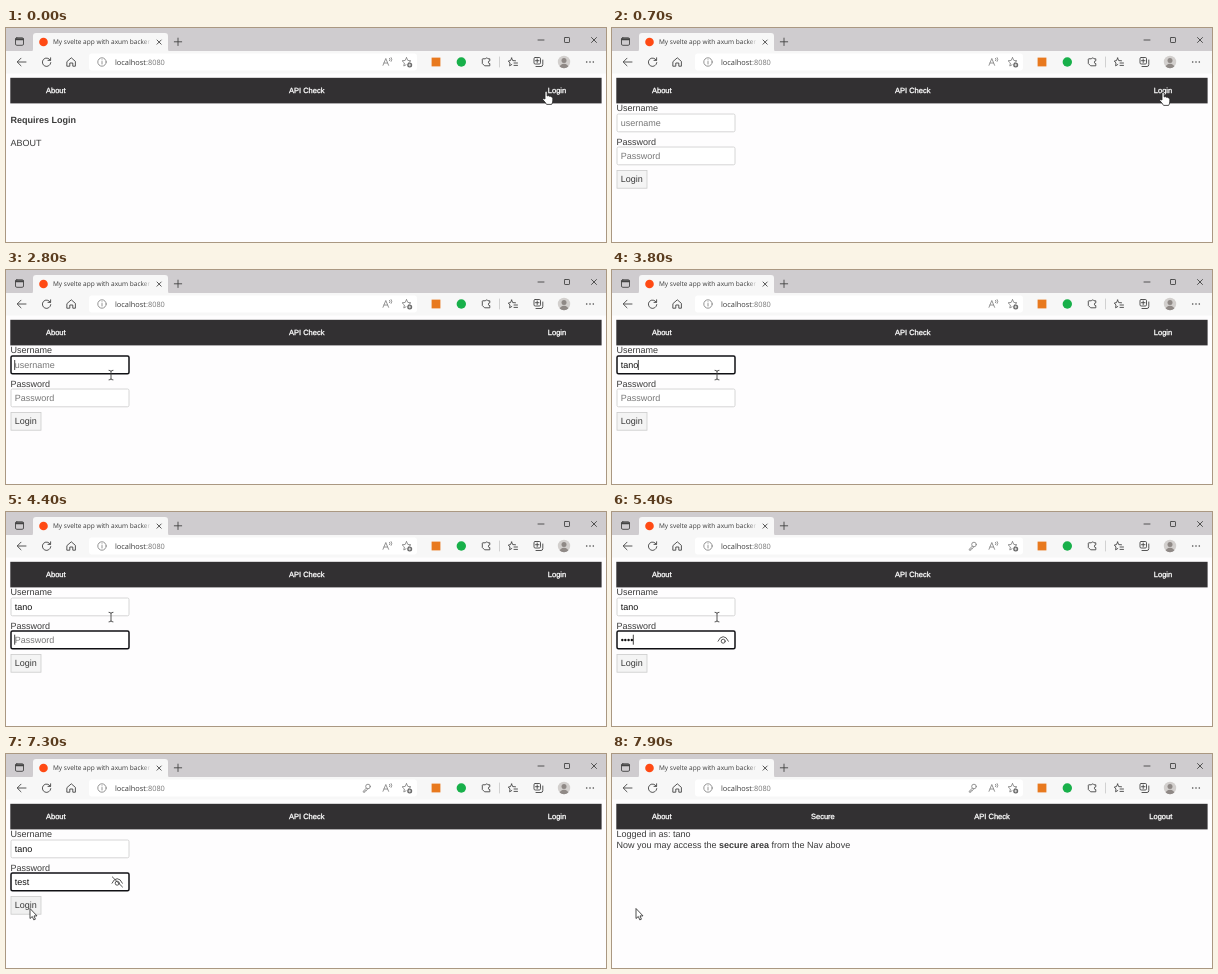
An HTML page for the animation above (8 s loop, 600x214 px).

```html
<!DOCTYPE html>
<html lang="en">
<head>
<meta charset="utf-8">
<title>Login demo</title>
<style>
  html, body { margin: 0; width: 100%; height: 100%; overflow: hidden; background: #fefdfe; }
  svg { display: block; }
  text { font: 9px "Liberation Sans", Arial, sans-serif; fill: #3a3a3a; white-space: pre; text-rendering: geometricPrecision; }
  .ui { font-family: "Open Sans", "Noto Sans", sans-serif; }
  .nav { font-size: 7.5px; fill: #fff; stroke: #fff; stroke-width: .3; }
  .b { font-weight: bold; }
  .hint { fill: #777; }
  .typed { fill: #111; }
  .line { fill: none; stroke: #444; stroke-width: .9; stroke-linecap: round; stroke-linejoin: round; }
  .soft { stroke: #888; }
  .box { fill: #fff; stroke: #ccc; stroke-width: .8; }
  .focus { stroke: #101014; stroke-width: 1.5; }
  .pointer { fill: #fff; stroke: #222; stroke-width: .8; stroke-linejoin: round; }
</style>
</head>
<body>
<svg width="600" height="214" viewBox="0 0 600 214">
  <clipPath id="title"><rect x="46" y="5" width="98" height="18"/></clipPath>
  <clipPath id="face"><circle cx="558" cy="34" r="6.2"/></clipPath>
  <linearGradient id="fade"><stop stop-color="#f7f7f7" stop-opacity="0"/><stop offset="1" stop-color="#f7f7f7"/></linearGradient>

  <!-- tab strip -->
  <rect width="600" height="24" fill="#cfcccf"/>
  <path d="M24 24Q27 24 27 21V8Q27 5 30 5H159Q162 5 162 8V21Q162 24 165 24Z" fill="#f7f7f7"/>
  <g class="line">
    <rect x="9.5" y="9.8" width="8" height="7.5" rx="1.3"/>
    <path d="M10 11.3H17" stroke-width="2"/>
    <path d="M151 12L155.2 16.2M155.2 12L151 16.2M168.3 13.8H175.7M172 10.1V17.5"/>
    <path d="M532 12H538M585.5 9.5L590.5 14.5M590.5 9.5L585.5 14.5"/>
    <rect x="558.5" y="9.5" width="5" height="5" rx=".6"/>
  </g>
  <circle cx="37.5" cy="14" r="4.3" fill="#ff4a14"/>
  <text class="ui" x="47" y="16.2" style="font-size:6.5px" clip-path="url(#title)">My svelte app with axum backend</text>
  <rect x="136" y="8" width="9" height="12" fill="url(#fade)"/>

  <!-- toolbar -->
  <rect y="23" width="600" height="22.5" fill="#f7f7f7"/>
  <rect x="83" y="25.5" width="328" height="17" rx="3" fill="#fff"/>
  <g class="line">
    <path d="M20 34H11.5M15 30.2L11.2 34L15 37.8"/>
    <path d="M44.3 32.2A4.2 4.2 0 1 0 44.8 34.6M44.6 29.8V32.4H42"/>
    <path d="M61.2 33.4L65.3 29.8L69.4 33.4V38.2H66.8V35H63.8V38.2H61.2Z"/>
    <path d="M477 30.8H479.4A1.4 1.4 0 0 1 482 30.8H483.8V32.8A1.4 1.4 0 0 0 483.8 35.6V37.8H478.6L476.3 35.5V31.6Z"/>
    <path d="M493.5 29V39" stroke="#ccc"/>
    <path d="M505.6 30L506.7 32.6L509.5 32.8M505.6 30L504.5 32.6L502.3 33L504 35L503.6 37.8L505.8 36.5M508 35H511.5M508 37.4H511.5"/>
    <rect x="528" y="29.5" width="6.5" height="6.5" rx="1.2"/>
    <path d="M530 38.5H535Q536.8 38.5 536.8 36.5V32M529.5 32.7H533M531.2 31V34.5"/>
  </g>
  <g class="line soft">
    <circle cx="96" cy="34" r="4.2"/>
    <path d="M96 33.5V36M96 31.8V31.9"/>
    <path d="M377 37.3L379.8 30.5L382.6 37.3M378 35H381.6M383.6 30.3Q384.6 31.5 383.6 32.7M385.2 29.6Q386.6 31.5 385.2 33.4"/>
    <path d="M400.5 29.6L401.8 32.4L404.9 32.8L402.8 34.4M400.5 29.6L399.2 32.4L396.1 32.8L398.4 35L397.8 38L400 36.8"/>
  </g>
  <circle cx="403.7" cy="37" r="2.5" fill="#666"/>
  <path d="M402.3 37H405.1M403.7 35.6V38.4" stroke="#fff" stroke-width=".7"/>
  <rect x="425.6" y="29.6" width="8.8" height="8.8" fill="#e8791e"/>
  <circle cx="455.3" cy="34" r="4.7" fill="#18b04a"/>
  <circle cx="558" cy="34" r="6.2" fill="#d2cfcd"/>
  <g clip-path="url(#face)" fill="#8f8986">
    <circle cx="558" cy="32.4" r="2.5"/><ellipse cx="558" cy="39.5" rx="4.6" ry="3.7"/>
  </g>
  <g fill="#444"><circle cx="580.7" cy="34" r=".8"/><circle cx="584" cy="34" r=".8"/><circle cx="587.3" cy="34" r=".8"/></g>
  <text class="ui" x="109" y="36.6" style="font-size:7.4px">localhost<tspan fill="#777">:8080</tspan></text>

  <rect x="4.3" y="49.8" width="591.3" height="25.6" fill="#323032"/>
  <g id="page"></g>
</svg>
<script>
const LOOP = 8000, TICK = 100;
const NAME = 'tano', SECRET = 'test';
const SHOW_FORM = 500, FOCUS = 1800, TAB = 4200, REVEAL = 6700, DONE = 7600;
const nameKeys = [3000, 3200, 3500, 3800];
const secretKeys = [4800, 5000, 5200, 5400];

// pointer path: time, x, y
const path = [
  [0, 540, 63], [300, 551, 64], [800, 551, 64], [1100, 380, 88], [1400, 152, 114],
  [1500, 138, 114], [1700, 118, 98], [2100, 105, 105], [5900, 105, 105],
  [6300, 118, 125], [6500, 112, 130], [6700, 112, 130], [7200, 28, 152], [7300, 24, 154.5], [LOOP, 24, 154.5]
];
const shapes = {
  hand: '<path class="pointer" d="M-1 8V1Q0 -1 1.2 1V5Q2.4 4 3.3 5.3Q4.6 4.6 5.3 6Q6.7 5.6 6.8 7.2V10Q6.6 12 5.6 13.4H.6Q-1 11 -3.2 8.6Q-3.2 6.6 -1 8Z"/>',
  arrow: '<path class="pointer" d="M0 0V10L2.3 8L3.8 11.4L5.4 10.7L4 7.4H7Z"/>',
  beam: '<path class="line" d="M-2 -4.7Q0 -4.7 0 -3.5Q0 -4.7 2 -4.7M0 -3.7V3.9M-2 4.9Q0 4.9 0 3.7Q0 4.9 2 4.9"/>'
};

const text = (x, y, s, cls = '') => `<text x="${x}" y="${y}" class="${cls}">${s}</text>`;
const nav = items => items.map(([x, s]) => text(x, 65.2, s, 'nav')).join('');
const count = (keys, t) => keys.filter(k => k <= t).length;

function pointer(t) {
  const i = path.findIndex(p => p[0] > t);
  const [t0, x0, y0] = path[i - 1], [t1, x1, y1] = path[i];
  const k = (t - t0) / (t1 - t0);
  const kind = t < 900 ? 'hand' : t >= 1700 && t < 6400 ? 'beam' : 'arrow';
  return `<g transform="translate(${x0 + (x1 - x0) * k} ${y0 + (y1 - y0) * k})">${shapes[kind]}</g>`;
}

// the caret restarts its blink at each focus or key press
function caret(t, chars, y, advance) {
  const start = Math.max(...[FOCUS, TAB, ...nameKeys, ...secretKeys].filter(k => k <= t));
  if (t >= REVEAL || (t - start) % 1000 >= 500) return '';
  const x = 8.7 + chars * advance;
  return `<path d="M${x} ${y}v10" stroke="#111" stroke-width=".8"/>`;
}

function field(y, value, hint, focused) {
  return `<rect class="box ${focused ? 'focus' : ''}" x="5" y="${y}" width="118" height="17.8" rx="1.5"/>` +
    text(8.7, y + 12, value || hint, value ? 'typed' : 'hint');
}

function eye(slashed) {
  return '<path class="line" d="M106 129.2Q108 124.7 111.2 124.7T116.4 129.2"/>' +
    '<circle class="line" cx="111.2" cy="129.2" r="2"/>' +
    (slashed ? '<path class="line" d="M106.3 122.9L116.5 133"/>' : '');
}

function form(t) {
  const a = count(nameKeys, t), b = count(secretKeys, t);
  const shown = t >= REVEAL;
  const hover = t >= 7200;
  return text(4.5, 83.4, 'Username') +
    field(86, NAME.slice(0, a), 'username', t >= FOCUS && t < TAB) +
    text(4.5, 116.8, 'Password') +
    field(119, shown ? SECRET : '•'.repeat(b), 'Password', t >= TAB) +
    `<rect class="box" x="5" y="142.4" width="30" height="17.8" style="fill:${hover ? '#f0f0f0' : '#f4f4f4'}"/>` +
    text(8.7, 154.2, 'Login') +
    (b ? eye(shown) : '') +
    (t >= TAB ? caret(t, b, 122.7, 3.15) : t >= FOCUS ? caret(t, a, 90, 4.4) : '');
}

const about = () => text(4.5, 95.2, 'Requires Login', 'b') + text(4.5, 118, 'ABOUT');
const welcome = () => text(4.5, 83.4, 'Logged in as: ' + NAME) +
  text(4.5, 93.6, 'Now you may access the <tspan class="b">secure area</tspan> from the Nav above');
const key = '<g class="line soft"><circle cx="362" cy="32.5" r="2.3"/><path d="M360.3 34.2L357.3 37.2V38.2H358.9V36.8H360.3L361.7 34.8"/></g>';

function draw(t) {
  const done = t >= DONE;
  return nav(done
      ? [[40, 'About'], [199, 'Secure'], [362.3, 'API Check'], [537.3, 'Logout']]
      : [[40, 'About'], [283, 'API Check'], [541.8, 'Login']]) +
    (t < SHOW_FORM ? about() : done ? welcome() : form(t)) +
    (t >= secretKeys[0] ? key : '') +
    pointer(t);
}

const page = document.getElementById('page');
let last = -1;
function frame() {
  const t = Math.floor(performance.now() % LOOP / TICK) * TICK;
  if (t !== last) page.innerHTML = draw(last = t);
  requestAnimationFrame(frame);
}
frame();
</script>
</body>
</html>
```
